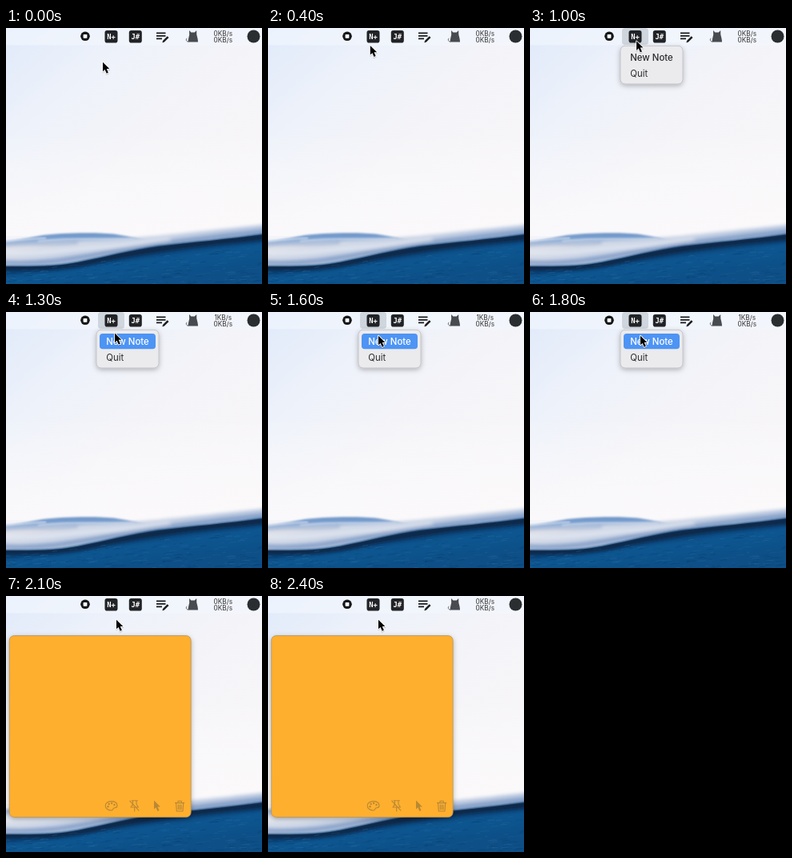
Animation, 320 px wide and 320 px high, one loop 2500 ms. Source, as an HTML page:

```html
<!DOCTYPE html>
<html lang="en">
<head>
<meta charset="utf-8">
<title>Menu bar notes</title>
<style>
  html, body { margin: 0; width: 100%; height: 100%; overflow: hidden; background: #f7f7fa; }
  svg { display: block; width: 100vw; height: 100vh; }
  text { font-family: Inter, Roboto, sans-serif; }
  .badge { font: bold 8.8px "DejaVu Sans Mono", monospace; fill: #fff; text-anchor: middle; }
  .rate { font-size: 8.3px; fill: #333; text-anchor: middle; }
  .item { font-size: 11.4px; fill: #2b2b2d; }
  .tools { fill: none; stroke: #b98835; stroke-width: 1.1; stroke-linecap: round; stroke-linejoin: round; }
</style>
</head>
<body>
<svg viewBox="0 0 320 320">
  <defs>
    <linearGradient id="sky" x1="0" y1="0" x2="0.75" y2="0.9">
      <stop offset="0" stop-color="#e0eafa"/>
      <stop offset=".3" stop-color="#eef2fa"/>
      <stop offset=".6" stop-color="#f5f4f8"/>
      <stop offset="1" stop-color="#f8f6f8"/>
    </linearGradient>
    <linearGradient id="haze" x1="0" y1="0" x2="0" y2="1">
      <stop offset="0" stop-color="#fff" stop-opacity="0"/>
      <stop offset="1" stop-color="#fcfafb" stop-opacity=".7"/>
    </linearGradient>
    <linearGradient id="far" x1="0" y1="255" x2="0" y2="276" gradientUnits="userSpaceOnUse">
      <stop offset="0" stop-color="#6790c4"/>
      <stop offset=".35" stop-color="#7ba0d0"/>
      <stop offset="1" stop-color="#b9cae4"/>
    </linearGradient>
    <linearGradient id="foam" x1="150" y1="250" x2="158" y2="292" gradientUnits="userSpaceOnUse">
      <stop offset="0" stop-color="#dde0e8"/>
      <stop offset=".4" stop-color="#c9d3e5"/>
      <stop offset="1" stop-color="#a3b8d8"/>
    </linearGradient>
    <linearGradient id="sea" x1="150" y1="276" x2="156" y2="322" gradientUnits="userSpaceOnUse">
      <stop offset="0" stop-color="#0c3a68"/>
      <stop offset=".4" stop-color="#0c5590"/>
      <stop offset="1" stop-color="#0b4f86"/>
    </linearGradient>
    <filter id="soft1" x="-10%" y="-30%" width="120%" height="160%"><feGaussianBlur stdDeviation="1"/></filter>
    <filter id="soft2" x="-10%" y="-60%" width="120%" height="220%"><feGaussianBlur stdDeviation="2.2"/></filter>
    <filter id="drop" x="-20%" y="-20%" width="140%" height="150%">
      <feDropShadow dx="0" dy="2" stdDeviation="3" flood-opacity=".28"/>
    </filter>
    <filter id="tipDrop" x="-50%" y="-30%" width="200%" height="180%">
      <feDropShadow dx="0" dy=".8" stdDeviation=".7" flood-opacity=".3"/>
    </filter>
    <path id="arrow" d="M0 0V13.4L3 10.6 5.4 16.2 7.9 15.1 5.5 9.6H9.6Z"/>
    <clipPath id="water">
      <path d="M-9 298C30 299 65 298 90 293 125 286 155 278 190 273 235 268 280 264 330 257V330H-9Z"/>
    </clipPath>
  </defs>

  <!-- wallpaper -->
  <rect width="320" height="320" fill="url(#sky)"/>
  <rect y="130" width="320" height="130" fill="url(#haze)"/>
  <path filter="url(#soft1)" fill="url(#far)" d="M-9 267C10 266 30 262 46 259 66 256 118 255 138 258 150 260 160 262 176 265V282H-9Z"/>
  <g filter="url(#soft1)" fill="none">
    <path stroke="#dfe6f3" stroke-width="2" opacity=".8" d="M-5 267.5C15 265 28 264 50 262.5"/>
    <path stroke="#cad7eb" stroke-width="2.5" opacity=".8" d="M40 267C75 262 100 265 160 264"/>
  </g>
  <path filter="url(#soft2)" fill="url(#foam)" d="M-9 271C20 269 55 268 95 266 145 264 180 261 225 256 265 252 295 249 330 245V302H-9Z"/>
  <g filter="url(#soft2)" fill="none">
    <path stroke="#7896c4" stroke-width="3" opacity=".55" d="M-5 272C25 267 50 273 90 268"/>
    <path stroke="#e3e8f2" stroke-width="5" opacity=".75" d="M-5 280C40 284 75 277 115 274S170 268 205 264"/>
    <path stroke="#6586b8" stroke-width="5" opacity=".65" d="M-5 293C45 296 80 289 125 281S210 266 330 254"/>
  </g>
  <path filter="url(#soft1)" fill="url(#sea)" d="M-9 297C30 298 65 297 90 292 125 285 155 277 190 272 235 267 280 263 330 256V330H-9Z"/>
  <g clip-path="url(#water)">
    <path filter="url(#soft2)" fill="none" stroke="#0b2440" stroke-width="8" opacity=".85" d="M-9 299C40 301 80 298 110 291S180 278 215 273 290 265 330 260"/>
    <g id="ripples" fill="none" stroke-width=".8"></g>
  </g>

  <!-- menu bar -->
  <rect width="320" height="21.3" fill="#f3f7fd" opacity=".65"/>
  <rect id="press" x="115" y="0" width="33" height="21" rx="4" fill="#18212c" opacity=".15"/>
  <circle cx="99" cy="10.3" r="5.8" fill="#151719"/>
  <rect x="96.6" y="7.9" width="4.8" height="4.8" rx=".8" fill="#fff"/>
  <g fill="#212326">
    <rect x="123.5" y="3" width="16" height="15.6" rx="2.8"/>
    <rect x="153.8" y="3" width="16" height="15.6" rx="2.8"/>
  </g>
  <text class="badge" x="131.5" y="13.9">N+</text>
  <text class="badge" x="161.7" y="13.9">J#</text>
  <g fill="none" stroke="#191b1d" stroke-width="1.7">
    <path d="M188 6.3H199.5M188 9.8H199.5M188 13.3H195"/>
    <path stroke-width="2.5" d="M196.8 16.9 202.6 11.1"/>
  </g>
  <path fill="#191b1d" d="M195.4 18.3 196 15.9 197.9 17.7Z"/>
  <path fill="#484b4f" d="M229 3 231.4 5.4H235.7L238.2 3 238.3 8.2C239 11 240 14 240 17.6H227.6C227.7 14 228.6 11 229.2 8.5Z"/>
  <path fill="none" stroke="#5c5f63" d="M226.3 12.8C224.6 14.3 225 17 228.2 17.1"/>
  <text id="up" class="rate" x="271.3" y="10.2"></text>
  <text class="rate" x="271.3" y="18">0KB/s</text>
  <circle cx="309.5" cy="10.5" r="8" fill="#2b2e31"/>

  <!-- drop-down -->
  <g id="menu">
    <rect x="113" y="22.3" width="78" height="47.7" rx="6" fill="#ebebee" stroke="#a9abb0" stroke-width=".6" filter="url(#drop)"/>
    <rect id="pick" x="117" y="27" width="70" height="19.3" rx="3.8" fill="#4d94f4"/>
    <text id="newNote" class="item" x="125.2" y="41" font-weight="500">New Note</text>
    <text class="item" x="125.2" y="60.7">Quit</text>
  </g>

  <!-- sticky note -->
  <g id="note">
    <rect x="4.2" y="49.6" width="227" height="226.8" rx="6" fill="#ffaf2e" stroke="#a98b55" stroke-width=".7" filter="url(#drop)"/>
    <g class="tools">
      <path d="M131.5 256.6C127 256.6 124.2 259.2 124.2 262.2S127.5 268 131.8 268C134 268 133.6 266 134.5 265.2 135.7 264.3 139 265.8 139 262 139 258.7 136 256.6 131.5 256.6Z"/>
      <g fill="#b98835" stroke="none">
        <circle cx="127.5" cy="263.2" r="1.2"/><circle cx="128.7" cy="260" r="1.2"/>
        <circle cx="132.2" cy="259" r="1.2"/><circle cx="135.5" cy="261" r="1.2"/>
      </g>
      <path d="M157 255.8H164.5M158.5 255.8V260.3L156 264H165.5L163 260.3V255.8M160.7 264V269M154.8 256.2 166 268.2"/>
      <use href="#arrow" transform="translate(185 255.6) scale(.82)" fill="#b98835" stroke="none"/>
      <path d="M211.5 258.6H222.8M215 258.4V256.3H219.3V258.4M212.6 258.8 213.3 269H221L221.7 258.8M215.3 261V266.7M217.2 261V266.7M219.1 261V266.7"/>
    </g>
  </g>

  <g id="cursor" filter="url(#tipDrop)">
    <use href="#arrow" transform="scale(.87)" fill="#050505" stroke="#fff" stroke-width="1.9" paint-order="stroke" stroke-linejoin="round"/>
  </g>
</svg>
<script>
  const LOOP = 2500, STEP = 100;
  const el = id => document.getElementById(id);
  const [press, up, menu, pick, newNote, note, cursor] =
    ["press", "up", "menu", "pick", "newNote", "note", "cursor"].map(el);

  // time, x, y of the pointer tip
  const path = [
    [0, 121, 42.7], [100, 121, 42.7], [600, 131.5, 10.7], [800, 131.5, 10.7],
    [1300, 136, 26.5], [1600, 138, 29.7], [LOOP, 138, 29.7]
  ];

  // faint ripples on the near water
  let seed = 7;
  const rnd = () => (seed = seed * 16807 % 2147483647) / 2147483647;
  el("ripples").innerHTML = Array.from({ length: 220 }, () => {
    const x = rnd() * 330 - 10, top = 304 - x * 0.1;
    const y = top + rnd() * (322 - top), w = 3 + rnd() * 9;
    const tone = rnd() < 0.5 ? "#3f80b4" : "#06305a";
    return `<path d="M${x} ${y}q${w / 2} -1.5 ${w} -.8" stroke="${tone}" opacity="${0.1 + rnd() * 0.25}"/>`;
  }).join("");

  function pointer(t) {
    const i = path.findIndex((p, k) => k && t <= p[0]);
    const [t0, x0, y0] = path[i - 1], [t1, x1, y1] = path[i];
    const u = (t - t0) / (t1 - t0), e = u * u * (3 - 2 * u);
    return [x0 + (x1 - x0) * e, y0 + (y1 - y0) * e];
  }

  const show = (node, on) => node.setAttribute("display", on ? "inline" : "none");
  const within = (t, a, b) => t >= a && t < b;

  function draw(t) {
    const [x, y] = pointer(t);
    const picked = within(t, 800, 2000) && y > 23;
    cursor.setAttribute("transform", `translate(${x} ${y})`);
    show(press, within(t, 700, 2100));
    show(menu, within(t, 800, 2000));
    menu.setAttribute("opacity", t >= 1900 ? 0.5 : 1);
    show(pick, picked);
    newNote.style.fill = picked ? "#fff" : "#2b2b2d";
    show(note, t >= 2100);
    up.textContent = (within(t, 1100, 2100) ? 1 : 0) + "KB/s";
  }

  const start = performance.now();
  function tick() {
    const t = (performance.now() - start) % LOOP;
    draw(Math.floor(t / STEP) * STEP);
    requestAnimationFrame(tick);
  }
  tick();
</script>
</body>
</html>
```
